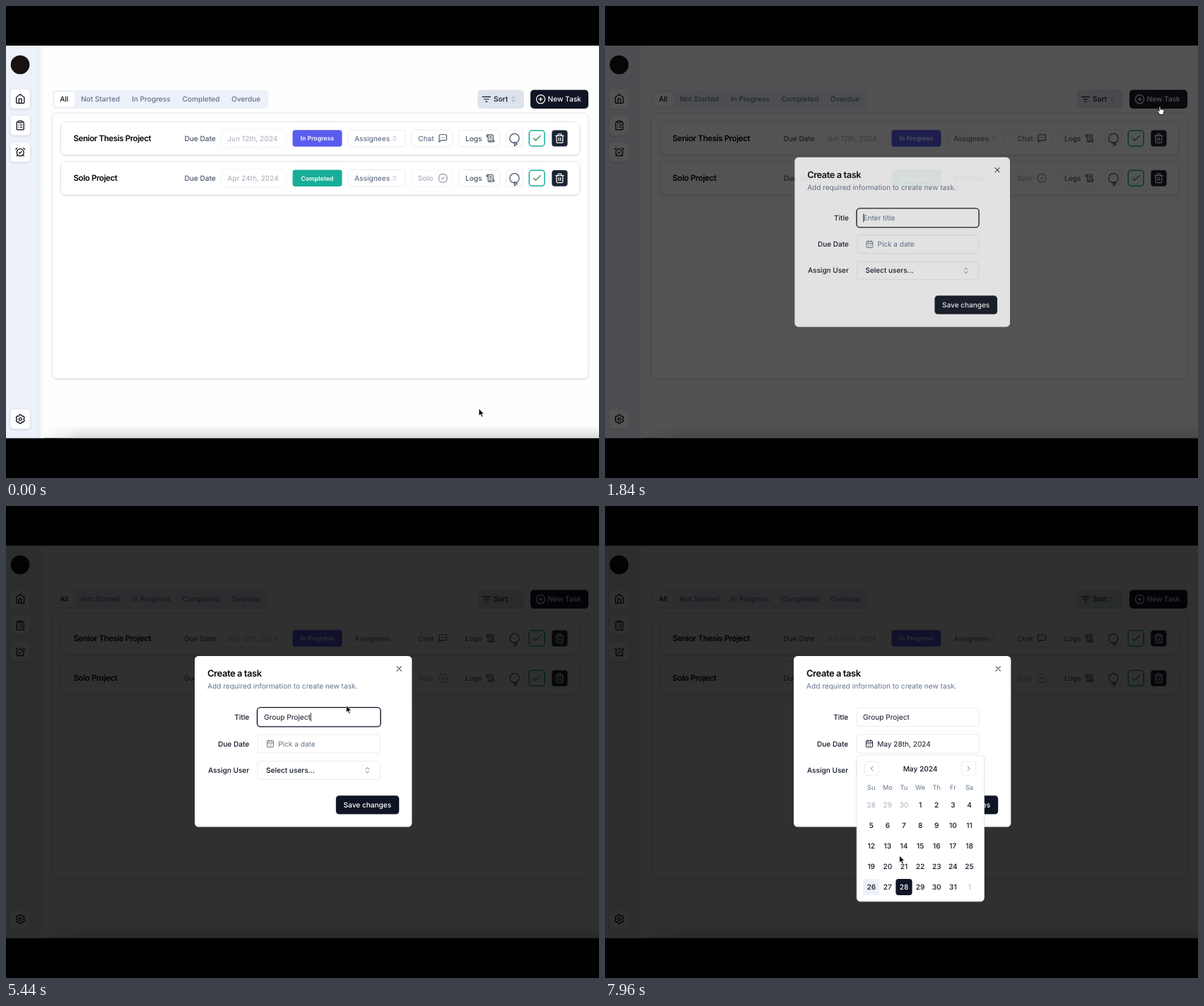
These frames come from a looping animation (839x667 px, 8000 ms). An HTML page:

```html
<!DOCTYPE html>
<html lang="en">
<head>
<meta charset="utf-8">
<title>Task board</title>
<style>
html, body { margin: 0; width: 100%; height: 100%; overflow: hidden; background: #000; }
svg { display: block; width: 839px; height: 667px; }
text { font-family: Inter, sans-serif; font-size: 10.1px; font-weight: 500; white-space: pre; text-rendering: geometricPrecision; }
</style>
</head>
<body>
<svg id="stage" viewBox="0 0 839 667"></svg>
<script>
const LOOP = 8000;
const INK = '#0f1524', MUTED = '#64748b', LINE = '#e2e6ee', TINT = '#edf1f9', TEAL = '#17ae98';

// ---------- drawing helpers ----------
const box = (x, y, x2, y2, r, fill, extra = '') =>
  `<rect x="${x}" y="${y}" width="${x2 - x}" height="${y2 - y}" rx="${r}" fill="${fill}" ${extra}/>`;
const framed = (x, y, x2, y2, r = 4, stroke = LINE, extra = '') =>
  box(x, y, x2, y2, r, '#fff', `stroke="${stroke}" stroke-width=".8" ${extra}`);
const label = (s, x, y, fill = INK, extra = '') =>
  `<text x="${x}" y="${y + 3.6}" fill="${fill}" ${extra}>${s}</text>`;
const MID = 'text-anchor="middle"', END = 'text-anchor="end"';

const dots = (xs, y) => xs.map(x => `M${x} ${y}h.01`).join('');
const ring = (cx, cy, r) => `M${cx - r} ${cy}a${r} ${r} 0 1 0 ${2 * r} 0a${r} ${r} 0 1 0 ${-2 * r} 0`;
function gear() {
  const pts = [];
  for (let i = 0; i < 6; i++) {
    for (const [da, r] of [[-13, 10], [13, 10], [22, 7.9], [38, 7.9]]) {
      const a = (i * 60 - 90 + da) * Math.PI / 180;
      pts.push((12 + r * Math.cos(a)).toFixed(2) + ' ' + (12 + r * Math.sin(a)).toFixed(2));
    }
  }
  return 'M' + pts.join('L') + 'Z' + ring(12, 12, 3);
}
const ICONS = {
  home: 'm3 9 9-7 9 7v11a2 2 0 0 1-2 2H5a2 2 0 0 1-2-2zM9 22V12h6v10',
  list: 'M9 2h6a1 1 0 0 1 1 1v2a1 1 0 0 1-1 1H9a1 1 0 0 1-1-1V3a1 1 0 0 1 1-1M16 4h2a2 2 0 0 1 2 2v14a2 2 0 0 1-2 2H6a2 2 0 0 1-2-2V6a2 2 0 0 1 2-2h2M12 11h4M12 16h4' + dots([8], 11) + dots([8], 16),
  alarm: ring(12, 13, 8) + 'M5 3 2 6m20 0-3-3M6.4 18.7 4 21m13.6-2.3L20 21M9 13l2 2 4-4',
  gear: gear(),
  sort: 'M2 6h20M6 12h12M10 18h4',
  updown: 'm7 15 5 5 5-5M7 9l5-5 5 5',
  plus: ring(12, 12, 10) + 'M8 12h8M12 8v8',
  chat: 'M21 15a2 2 0 0 1-2 2H7l-4 4V5a2 2 0 0 1 2-2h14a2 2 0 0 1 2 2z' + dots([8, 12, 16], 10),
  scroll: 'M15 12h-5M15 8h-5M19 17V5a2 2 0 0 0-2-2H4M8 21h12a2 2 0 0 0 2-2v-1a1 1 0 0 0-1-1H11a1 1 0 0 0-1 1v1a2 2 0 1 1-4 0V5a2 2 0 1 0-4 0v2a1 1 0 0 0 1 1h3',
  play: ring(12, 12, 10) + 'm10 8 6 4-6 4z',
  check: 'M20 6 9 17l-5-5',
  trash: 'M3 6h18M19 6v14a2 2 0 0 1-2 2H7a2 2 0 0 1-2-2V6M8 6V4a2 2 0 0 1 2-2h4a2 2 0 0 1 2 2v2M10 11v6M14 11v6',
  badge: 'M3.85 8.62a4 4 0 0 1 4.78-4.77 4 4 0 0 1 6.74 0 4 4 0 0 1 4.78 4.78 4 4 0 0 1 0 6.74 4 4 0 0 1-4.77 4.78 4 4 0 0 1-6.75 0 4 4 0 0 1-4.78-4.77 4 4 0 0 1 0-6.76zM9 12l2 2 4-4',
  dates: 'M5 4h14a2 2 0 0 1 2 2v14a2 2 0 0 1-2 2H5a2 2 0 0 1-2-2V6a2 2 0 0 1 2-2M16 2v4M8 2v4M3 10h18' + dots([8, 12, 16], 14) + dots([8, 12, 16], 18),
  close: 'M18 6 6 18M6 6l12 12',
  left: 'm15 18-6-6 6-6',
  right: 'm9 18 6-6-6-6'
};
const icon = (name, cx, cy, size, color, extra = '') =>
  `<path d="${ICONS[name]}" transform="translate(${cx - size / 2} ${cy - size / 2}) scale(${size / 24})" fill="none" stroke="${color}" stroke-width="2" stroke-linecap="round" stroke-linejoin="round" ${extra}/>`;

// ---------- board ----------
function sideButton(name, y) {
  return framed(6.2, y - 14, 34.2, y + 14, 5, '#e3e7f0', 'filter="url(#soft)"') + icon(name, 20.2, y, 15, '#05070c');
}

function row(y, title, due, status, color, kind) {
  const solo = kind === 'Solo';
  const small = 'style="font-size:8.7px;font-weight:600"';
  return framed(77.5, y - 23.5, 811.5, y + 23.5, 7, '#dfe2e8', 'filter="url(#soft)"') +
    label(title, 95.5, y + .3, '#05070c', 'style="font-size:11.5px;font-weight:600;letter-spacing:-.4px"') +
    label('Due Date', 252.5, y, '#4b5668') +
    framed(304.5, y - 12.7, 396.5, y + 12.7, 4, '#eff1f5') +
    label(due, 313.3, y + .2, '#a6adb8', 'style="font-weight:400"') +
    box(405.5, y - 11.8, 475.5, y + 11.8, 4, color) +
    label(status, 440.3, y - .4, '#fff', MID + ' ' + small) +
    framed(484, y - 11.8, 564.8, y + 11.8) + label('Assignees', 493, y, MUTED) +
    icon('updown', 549.8, y, 9.5, MUTED, 'opacity=".7"') +
    `<g opacity="${solo ? .55 : 1}">` + framed(573.8, y - 11.8, 631.8, y + 11.8) +
    label(kind, 583, y, MUTED) + icon(solo ? 'badge' : 'chat', 618.2, y, solo ? 15 : 14, '#4b5668') + '</g>' +
    framed(640.8, y - 11.8, 698.8, y + 11.8) + label('Logs', 650, y, '#4b5668') + icon('scroll', 685.4, y, 13, '#3c4658') +
    framed(707.8, y - 11.6, 731, y + 11.6) + icon('play', 719.4, y, 16, '#4b5a72') +
    box(740.2, y - 11, 762, y + 11, 4, '#fff', `stroke="${TEAL}" stroke-width="1.5"`) + icon('check', 751.2, y, 14.5, '#148a4c') +
    box(772.3, y - 11.4, 794.5, y + 11.4, 4, '#1c2333') + icon('trash', 783.4, y, 15, '#fff');
}

const tabs = [['Not Started', 133.5], ['In Progress', 205.4], ['Completed', 275.8], ['Overdue', 339.6]];
const board = box(0, 56, 839, 610.5, 0, '#fefefe') +
  box(44, 56, 54, 610.5, 0, 'url(#edge)') + box(44, 592, 839, 610.5, 0, 'url(#floor)', 'mask="url(#fadeIn)"') +
  box(0, 56, 44.5, 610.5, 0, TINT) +
  '<circle cx="20" cy="83" r="13.3" fill="#17110f"/>' +
  sideButton('home', 131) + sideButton('list', 168.7) + sideButton('alarm', 206.3) + sideButton('gear', 583.7) +
  box(66, 118.8, 371.5, 145, 5, TINT) + box(68.3, 121.5, 97, 142, 3, '#fff') +
  label('All', 82.3, 131.7, INK, MID) + tabs.map(([s, x]) => label(s, x, 131.7, MUTED, MID)).join('') +
  box(667.3, 118.6, 733, 145, 5, '#dde3ec') + icon('sort', 679.8, 131.7, 13.5, INK) +
  label('Sort', 690, 131.7) + icon('updown', 718, 131.7, 9.5, MUTED) +
  box(742, 118.6, 824, 145, 5, INK, 'id="newTask"') + icon('plus', 756.5, 131.7, 14.6, '#fff') + label('New Task', 766.6, 131.7, '#fff') +
  framed(65.3, 151.3, 824, 526.3, 7, '#dfe2e8', 'filter="url(#soft)"') +
  row(187, 'Senior Thesis Project', 'Jun 12th, 2024', 'In Progress', '#5a5ced', 'Chat') +
  row(243.3, 'Solo Project', 'Apr 24th, 2024', 'Completed', TEAL, 'Solo');

// ---------- dialog ----------
const dialog = '<g id="dialog">' + box(267, 212, 574.3, 453.6, 5.5, '#fff') +
  label('Create a task', 285, 237.6, '#05070c', 'style="font-size:12.9px;font-weight:600;letter-spacing:-.4px"') +
  label('Add required information to create new task.', 285, 254.8, MUTED, 'style="font-weight:400"') +
  icon('close', 556.2, 230, 12.5, '#3f4551') +
  label('Title', 344.2, 298.2, INK, END) + label('Due Date', 344.2, 336, INK, END) + label('Assign User', 344.2, 373.4, INK, END) +
  framed(356, 285.2, 529.5, 311.3) +
  box(355.4, 284.6, 530, 311.9, 4.6, 'none', 'id="focus" stroke="#111827" stroke-width="1.4"') +
  label('', 365, 298.2, INK, 'id="title" style="font-weight:400"') +
  box(365, 292.3, 365.9, 304.3, 0, '#000', 'id="caret"') +
  framed(356, 322.8, 529.5, 349, 4, LINE, 'id="dueBox"') +
  '<g id="dueIcon">' + icon('dates', 374, 335.8, 12, 'currentColor') + '</g>' +
  label('', 385.2, 336, MUTED, 'id="due" style="font-weight:400"') +
  framed(356, 360.4, 529.5, 386.4) + label('Select users...', 368, 373.4) + icon('updown', 511.4, 373.4, 11.5, '#6b7280') +
  box(466.8, 409.2, 556.2, 435.5, 4.5, INK) + label('Save changes', 511.4, 422.4, '#fff', MID) + '</g>';

// ---------- calendar ----------
const colX = c => 376.7 + c * 23.13, rowY = r => 422.5 + r * 29;
let days = '';
for (let i = 0; i < 35; i++) {
  const x = colX(i % 7), y = rowY(Math.floor(i / 7));
  const n = i < 3 ? 28 + i : i < 34 ? i - 2 : 1, out = i < 3 || i > 33;
  days += box(x - 11.6, y - 11.6, x + 11.6, y + 11.6, 4, 'none', `id="cell${i}"`) +
    label(n, x, y, out ? '#a9b1bd' : INK, `${MID} id="day${i}" style="font-weight:${out ? 400 : 500}"`);
}
const navBox = (name, x) => '<g opacity=".6">' + framed(x - 10, 361, x + 10, 381, 4, '#d5dae3') + icon(name, x, 371, 11.5, INK) + '</g>';
const calendar = '<g id="calendar">' + framed(356.2, 352.2, 536.4, 558.8, 5, LINE, 'filter="url(#soft)"') +
  navBox('left', 377.6) + navBox('right', 514.6) + label('May 2024', 446, 371, INK, MID) +
  ['Su', 'Mo', 'Tu', 'We', 'Th', 'Fr', 'Sa'].map((d, c) =>
    label(d, colX(c), 397.7, MUTED, MID + ' style="font-size:9.2px;font-weight:400"')).join('') + days + '</g>';

const pointer = '<g id="pointer" stroke-linejoin="round">' +
  '<path id="arrow" d="M0 0V10.2L2.3 8.1 3.9 11.7 5.7 10.9 4.1 7.4H7.3Z" fill="#000" stroke="#fff" stroke-width=".8"/>' +
  '<path id="hand" d="M-1 .9a1 1 0 0 1 2 0V4.4a.9.9 0 0 1 1.8.1 .9.9 0 0 1 1.7.4 .8.8 0 0 1 1.6.6C6.1 8.4 5 9.2 4.8 11.6H-.5C-.9 9.7-2.6 8-3.4 6.4c-.4-.9.7-1.5 1.4-.8l1 1.1z" fill="#fff" stroke="#000" stroke-width=".9"/></g>';

const stage = document.getElementById('stage');
stage.innerHTML = `<defs>
  <filter id="soft" x="-10%" y="-10%" width="120%" height="125%"><feDropShadow dx="0" dy=".9" stdDeviation=".9" flood-color="#1b2233" flood-opacity=".16"/></filter>
  <linearGradient id="edge"><stop stop-color="#e6e9ef"/><stop offset="1" stop-color="#fefefe"/></linearGradient>
  <linearGradient id="floor" x2="0" y2="1"><stop stop-color="#fefefe"/><stop offset="1" stop-color="#dadada"/></linearGradient>
  <linearGradient id="ramp"><stop offset=".01" stop-color="#000"/><stop offset=".08" stop-color="#fff"/></linearGradient>
  <mask id="fadeIn">${box(44, 592, 839, 611, 0, 'url(#ramp)')}</mask></defs>` +
  box(0, 0, 839, 667, 0, '#000') + board + box(0, 56, 839, 611, 0, '#000', 'id="shade"') + dialog + calendar + pointer;

// ---------- motion ----------
const $ = id => document.getElementById(id);
const set = (id, name, value) => $(id).setAttribute(name, value);
const show = (id, on) => set(id, 'visibility', on ? 'visible' : 'hidden');
const clamp = v => Math.max(0, Math.min(1, v));
const smooth = v => v * v * (3 - 2 * v);

// CSS "ease": cubic-bezier(.25, .1, .25, 1)
function ease(x) {
  if (x <= 0 || x >= 1) return clamp(x);
  const curve = (u, a, b) => 3 * u * (1 - u) * (1 - u) * a + 3 * u * u * (1 - u) * b + u * u * u;
  let lo = 0, hi = 1;
  for (let i = 0; i < 20; i++) {
    const m = (lo + hi) / 2;
    if (curve(m, .25, .25) < x) lo = m; else hi = m;
  }
  return curve(lo, .1, 1);
}

const path = [[60, 669, 569], [680, 783, 232], [860, 783, 232], [1080, 785, 188], [1220, 785, 188], [1560, 785, 142],
  [1920, 785, 142], [2440, 493, 274], [5300, 493, 274], [5960, 393.5, 339], [6150, 393.5, 339],
  [6960, 422, 541], [7140, 422, 541], [7160, 423.5, 541.5], [7620, 423.5, 541.5], [7960, 416.5, 494]];
function pointerAt(t) {
  if (t <= path[0][0]) return path[0].slice(1);
  for (let i = 1; i < path.length; i++) {
    const [ta, xa, ya] = path[i - 1], [tb, xb, yb] = path[i];
    if (t < tb) {
      const k = smooth((t - ta) / (tb - ta));
      return [xa + (xb - xa) * k, ya + (yb - ya) * k];
    }
  }
  return path[path.length - 1].slice(1);
}

const TYPED = 'Group Project';
const keys = [2960, 3280, 3480, 3600, 3840, 4200, 4440, 4680, 4760, 4920, 4960, 5120, 5320];
const OPEN = 1780, BLUR = 6040, PICK = 7510;

function zoom(id, p, cx, cy, dy) {
  const s = .95 + .05 * p;
  set(id, 'transform', `translate(${cx} ${cy + dy * (1 - p)}) scale(${s}) translate(${-cx} ${-cy})`);
  set(id, 'opacity', p);
}

function draw(t) {
  const [px, py] = pointerAt(t);
  const p = t < OPEN ? 0 : ease((t - 1735) / 200);
  set('shade', 'opacity', .81 * p);
  zoom('dialog', p, 420.6, 332.8, 4.8);

  const warm = clamp((t - 1440) / 120) * (1 - clamp((t - OPEN) / 120));
  const mix = [[15, 36], [21, 39], [36, 51]].map(([a, b]) => Math.round(a + (b - a) * warm));
  set('newTask', 'fill', `rgb(${mix})`);

  // title field
  const count = keys.filter(k => k <= t).length;
  const title = $('title');
  title.textContent = count ? TYPED.slice(0, count) : 'Enter title';
  title.setAttribute('fill', count ? INK : MUTED);
  const since = t - (count ? keys[count - 1] : OPEN);
  const end = count ? title.getComputedTextLength() : 0;
  set('caret', 'x', 365 + end);
  show('caret', t < BLUR && Math.floor(since / 490) % 2 === 0);
  show('focus', t < BLUR);

  // date field
  const picked = t >= PICK;
  const overDue = t > 5320 && px > 356 && px < 529.5 && py > 322.8 && py < 349;
  const dueInk = picked || overDue ? INK : MUTED;
  $('due').textContent = picked ? 'May 28th, 2024' : 'Pick a date';
  set('due', 'fill', dueInk);
  set('dueIcon', 'color', dueInk);
  set('dueBox', 'fill', overDue ? TINT : '#fff');

  // calendar
  const q = ease((t - 6045) / 150);
  zoom('calendar', q, 446.3, 455.5, -5.8);
  let overDay = false;
  for (let i = 0; i < 35; i++) {
    const over = q > .9 && Math.abs(px - colX(i % 7)) < 11.6 && Math.abs(py - rowY(Math.floor(i / 7))) < 11.6;
    const chosen = picked && i === 30;
    overDay = overDay || over;
    set('cell' + i, 'fill', chosen ? INK : over || i === 28 ? TINT : 'none');
    if (i === 30) set('day30', 'fill', chosen ? '#fff' : INK);
  }

  // pointer
  const hand = (t >= OPEN && t < 1960) || overDue || overDay;
  const shown = t < 2960 || t >= 5310;
  set('pointer', 'transform', `translate(${px} ${py})`);
  show('arrow', shown && !hand);
  show('hand', shown && hand);
}

function tick() {
  draw(performance.now() % LOOP);
  requestAnimationFrame(tick);
}
tick();
</script>
</body>
</html>
```
